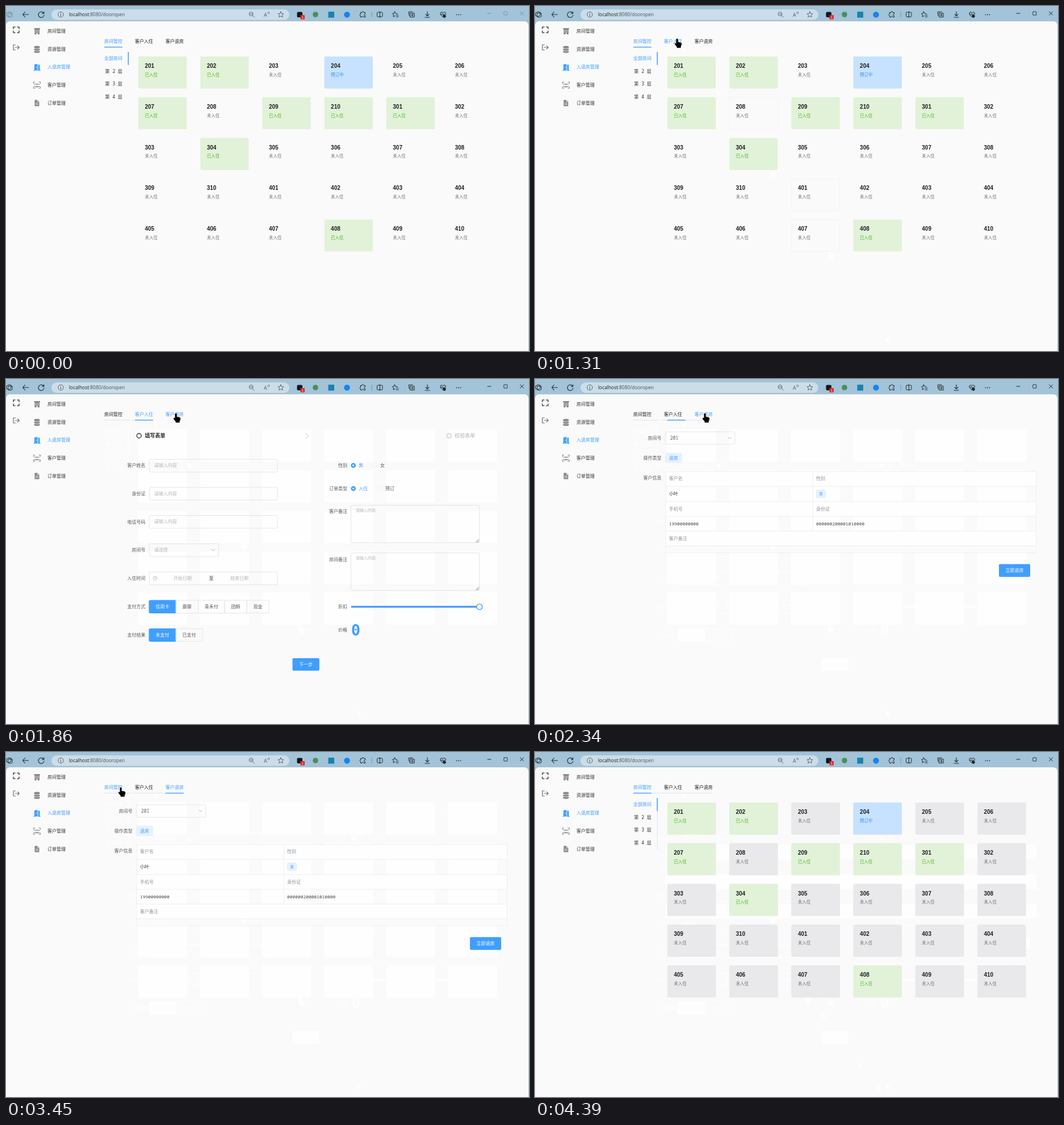
Write an HTML page with a canvas that moves like this. It is 921 px wide and 608 px high and loops after 4760 ms.

```html
<!DOCTYPE html>
<html lang="zh">
<head>
<meta charset="utf-8">
<title>房间管控</title>
<style>
html, body { margin: 0; width: 100%; height: 100%; overflow: hidden; background: #fafafa; }
canvas { display: block; width: 921px; height: 608px; }
</style>
</head>
<body>
<canvas id="stage" width="921" height="608"></canvas>
<script>
const ctx = document.getElementById('stage').getContext('2d');
const LOOP = 4760;
const ACTIVATE = 1310, TO_FORM = 1380, TO_CHECKOUT = 2340, TO_ROOMS = 3650;
const BLUE = '#409eff', INK = '#303133', GREY = '#909399', PALE = '#b3b6bc', LINE = '#e3e5ea';
const GREEN_BG = '#e1f2d8', BLUE_BG = '#c6e2ff', GREY_BG = '#e9e9eb', GHOST = '#fefefe';
const MONO = '"Noto Sans Mono", "Noto Sans CJK SC", "Noto Sans CJK", monospace';
const SANS = '"Liberation Sans", "Noto Sans CJK SC", sans-serif';

// The screen refreshes only at these moments.
const STEPS = [0, 360, 450, 550, 640, 740, 830, 940, 1030, 1310, 1380, 1470, 1570, 1670, 1770, 1860,
  2340, 2430, 2510, 2600, 2940, 3030, 3110, 3200, 3280, 3370, 3450,
  3650, 3740, 3800, 3870, 3950, 4030, 4110, 4200, 4290, 4390];

// Pointer tip: time, x, y
const PATH = [[360, 618, 582], [450, 518, 432], [550, 416, 286], [640, 320, 146], [740, 260, 71],
  [940, 254, 62], [1030, 250, 58], [1470, 250, 58], [1570, 262, 60], [1770, 297, 61], [1860, 299, 61],
  [2600, 299, 61], [2940, 290, 62], [3110, 258, 64], [3280, 220, 62], [3450, 202, 63], [3740, 202, 63],
  [3800, 290, 180], [3870, 400, 325], [3950, 478, 427], [4030, 505, 458], [4110, 533, 493],
  [4200, 570, 546], [4290, 603, 586], [4390, 621, 610]];

const TABS = ['房间管控', '客户入住', '客户退房'];
const tabX = i => 173 + 54 * i;

const ROOMS = Array.from({ length: 30 }, (_, i) => 201 + i % 10 + 100 * Math.floor(i / 10));
const TAKEN = [201, 202, 207, 209, 210, 301, 304, 408], BOOKED = 204;
const HOVERS = [[407, 450], [401, 550], [304, 550], [208, 640], [201, 740]];

let tint = null;
const paint = c => tint || c;

function box(x, y, w, h, r, fill, stroke, lw = 1) {
  ctx.beginPath();
  ctx.roundRect(x, y, w, h, r);
  if (fill) { ctx.fillStyle = paint(fill); ctx.fill(); }
  if (stroke) { ctx.strokeStyle = paint(stroke); ctx.lineWidth = lw; ctx.stroke(); }
}

function disc(x, y, r, fill, stroke, lw = 1) {
  box(x - r, y - r, 2 * r, 2 * r, r, fill, stroke, lw);
}

// y is the optical middle of the line
function text(s, x, y, color = INK, size = 8, align = 'left', weight = 400, family = MONO) {
  ctx.font = `${weight} ${size}px ${family}`;
  ctx.textAlign = align;
  ctx.fillStyle = paint(color);
  ctx.fillText(s, x, y + size * 0.37);
}

function icon(x, y, d, color, lw = 1, fill = false) {
  const p = new Path2D(d);
  ctx.save();
  ctx.translate(x, y);
  ctx.lineWidth = lw;
  ctx.lineJoin = ctx.lineCap = 'round';
  ctx.strokeStyle = ctx.fillStyle = paint(color);
  if (fill) ctx.fill(p); else ctx.stroke(p);
  ctx.restore();
}

const STAR = 'M0-5 1.5-1.7 5-1.4 2.4 1 3.2 4.6 0 2.7-3.2 4.6-2.4 1-5-1.4-1.5-1.7Z';
const CHEVRON = 'M-3-1.5 0 1.5 3-1.5';

function drawBrowser(t) {
  const ink = '#20262b', soft = '#4c5a64';
  const chrome = t < ACTIVATE ? '#7791a0' : ink;
  box(0, 0, 921, 608, 0, '#a2c3d8');
  box(0, 27, 920, 590, 7, '#fafafa');
  icon(6, 15, 'M-5-2.5-1-5 3-4V1L-1 4-5 2ZM-2-2.5H5V3.5L2 5-2 4Z', chrome);
  icon(34.5, 15, 'M5 0H-5M-1-4.5-5 0-1 4.5', ink, 1.1);
  icon(62, 15, 'M4.5-2A5 5 0 1 0 5 1M4.8-5V-1.8H1.6', ink, 1.1);
  box(80, 6, 419, 18.5, 9.2, '#cbdde8');
  disc(96.5, 15, 4.7, null, soft, 0.9);
  icon(96.5, 15, 'M0-.5V2.5M0-2.4V-2.2', soft);
  const url = '"Open Sans", sans-serif';
  text('localhost', 111, 15, '#1b1f22', 8.4, 'left', 400, url);
  const w = ctx.measureText('localhost').width;
  text(':8080/dooropen', 111 + w, 15, '#48545c', 8.4, 'left', 400, url);
  icon(433, 15, 'M2-1A3.4 3.4 0 1 1-4.8-1 3.4 3.4 0 1 1 2-1M1 1.6 4.5 5M-3-1H.3', soft, 0.9);
  text('A', 454, 15.5, soft, 9, 'left', 400, url);
  icon(461, 12, 'M0-1Q1 0 0 1M2-2Q3.5 0 2 2', soft, 0.8);
  icon(484, 15, STAR, soft, 0.9);

  box(512.5, 10.5, 9.5, 9.5, 2, '#161616');
  box(518.5, 16, 7.5, 7.5, 1, '#e0262c');
  text('1', 522.2, 19.8, '#fff', 6, 'center', 400, SANS);
  disc(545, 15, 4.8, '#4c8f54');
  box(567.5, 10, 10.5, 10.5, 0, '#1683b0');
  disc(600.5, 15.2, 5.2, '#1683f0');
  icon(628.5, 15, 'M-4-3.5H-1.5Q-1.5-5.5 0-5.5T1.5-3.5H4V-1Q2-1 2 .5T4 2V4.5H1.5Q1.5 3 0 3T-1.5 4.5H-4V2Q-5.5 2-5.5 .5T-4-1Z', ink);
  icon(644, 15, 'M0-4.5V4.5', '#7391a3', 0.9);
  box(653.5, 11, 9.5, 8, 1.5, null, ink);
  icon(658.3, 15, 'M0-5V5', ink);
  icon(686, 15, 'M-1.5-5-.2-2 3-1.6M-1.5-5-2.8-2-5.5-1.6-3.4.6-4 4-1.2 2.4M1 1H5M1 4H5', ink);
  icon(714, 15, 'M-2-2.5H5V4.5H-2ZM-4 2-5-4.5 2-5M1.5-1V3M-.5 1H3.5', ink);
  icon(742, 15, 'M0-5V2.5M-3-.4 0 2.6 3-.4M-4 5H4', ink, 1.1);
  icon(769.5, 15, 'M0 4.5-4.5 0Q-5.5-4-2.5-4.3-.8-4.3 0-2.7.8-4.3 2.5-4.3 5.5-4 4.8-.2M-4 0H-2L-1-1.5.5 1.5 1.5 0H3', ink);
  disc(772, 18, 2.7, ink);
  for (const dx of [-3.5, 0, 3.5]) disc(797 + dx, 15.3, 0.9, ink);
  icon(851, 13, 'M-3 0H3', chrome);
  box(876.8, 10, 6, 6, 0.5, null, chrome, 0.9);
  icon(908.5, 13, 'M-3-3 3 3M3-3-3 3', chrome);
}

function drawMenu() {
  const dark = '#4d4f53', mid = '#85888e';
  icon(18, 42, 'M-5-2V-5H-2M2-5H5V-2M5 2V5H2M-2 5H-5V2', dark, 1.6);
  icon(18, 73, 'M-1.5-4.5H-5V4.5H-1.5M-2 0H5M2.5-2.8 5.3 0 2.5 2.8', '#6b6e73', 1.2);

  box(49.5, 39, 10.5, 2, 0, mid);
  box(50.5, 41, 8.5, 9, 0, mid);
  for (const x of [52, 54.2, 56.4]) for (const y of [42.5, 45]) box(x, y, 1.1, 1.3, 0, '#fafafa');
  box(53.7, 47.5, 2, 2.5, 0, '#fafafa');

  for (const y of [72, 76, 80]) icon(54.5, y, 'M-5 0Q-5-1.7 0-1.7T5 0V1Q5 2.7 0 2.7T-5 1Z', mid, 1, true);
  icon(54.5, 74.6, 'M-5 0Q0 2 5 0M-5 4Q0 6 5 4', '#fafafa', 0.6);

  icon(54.5, 108, 'M-4.5-5 1-6V6L-4.5 5ZM2-4.5H5V5H6.5V6H2Z', BLUE, 1, true);
  box(48.5, 113, 3, 1, 0, BLUE);
  disc(53.8, 108, 0.8, '#fafafa');

  icon(54.5, 139.5, 'M-6-3V-5.5H-3.5M3.5-5.5H6V-3M6 3V5.5H3.5M-3.5 5.5H-6V3', mid, 1.1);
  for (const [dx, r] of [[-3.3, 1.1], [0, 1.4], [3.3, 1.1]]) disc(54.5 + dx, 137.8, r, mid);
  icon(54.5, 141.8, 'M-5 1Q-3.3-3-1.8 1ZM-2.2 1.5Q0-4 2.2 1.5ZM1.8 1Q3.3-3 5 1Z', mid, 1, true);

  icon(54.5, 171, 'M-4-5.5H1L4-2.5V5.5H-4Z', mid, 1, true);
  icon(54.5, 171, 'M-2 .2H2M-2 2.5H2M1-5V-2.5H3.5', '#fafafa', 0.8);

  ['房间管理', '资源管理', '入退房管理', '客户管理', '订单管理'].forEach((s, i) =>
    text(s, 73, 44 + 31.7 * i, i === 2 ? BLUE : INK));
}

const clamp = v => Math.max(0, Math.min(1, v));
const ease = k => k < 0.5 ? 2 * k * k : 1 - 2 * (1 - k) * (1 - k);
const moved = (t, start) => ease(clamp((t - start) / 300));

function pointer(t) {
  if (t < PATH[0][0] || t >= 4390) return null;
  const i = PATH.findIndex(p => p[0] > t) - 1;
  const [t0, x0, y0] = PATH[i], [t1, x1, y1] = PATH[i + 1];
  const k = (t - t0) / (t1 - t0);
  return [x0 + (x1 - x0) * k, y0 + (y1 - y0) * k];
}

const tabAt = (x, y) => y < 70 ? TABS.findIndex((_, i) => x >= tabX(i) - 11 && x < tabX(i) + 43) : -1;
const viewAt = t => t < TO_FORM || t >= TO_ROOMS ? 0 : t < TO_CHECKOUT ? 1 : 2;

function drawTabs(t, tip) {
  const active = viewAt(t), hover = tip ? tabAt(...tip) : -1;
  TABS.forEach((s, i) => text(s, tabX(i), 62, i === active || i === hover ? BLUE : '#1d1e20'));
  if (t >= TO_FORM) {
    const end = t < TO_CHECKOUT ? 259 : 313;
    box(173, 72, 46, 1, 0, '#e1e4ea');
    box(222, 72, end - 222, 1, 0, '#e1e4ea');
  }
  const x = 173 + 54 * (moved(t, 1340) + moved(t, 2270)) - 108 * moved(t, 3620);
  box(x, 71.8, 32, 1.4, 0, BLUE);
}

function drawFloors(rail) {
  if (rail) box(214.8, 81, 1, 91, 0, '#e1e4ea');
  ['全部房间', '第 2 层', '第 3 层', '第 4 层'].forEach((s, i) =>
    text(s, 205, 92.3 + 22.6 * i, i ? INK : BLUE, 8, 'right'));
  box(214.6, 81, 1.6, 23, 0, BLUE);
}

const cardPos = i => [233 + 109.2 * (i % 6), 89 + 71.8 * Math.floor(i / 6)];

function card(i, fill, stroke) {
  const [x, y] = cardPos(i);
  box(x, y, 85.4, 56.4, 2, fill, stroke);
}

function drawRooms(t) {
  const late = t >= TO_ROOMS;
  drawFloors(late);
  if (!late) for (const [room, from] of HOVERS) {
    if (t < from) continue;
    ctx.save();
    if (t - from < 200) { ctx.shadowBlur = 8; ctx.shadowColor = 'rgba(0,0,0,.12)'; }
    card(ROOMS.indexOf(room), '#fafafa', TAKEN.includes(room) ? '#fff' : '#f3f3f4');
    ctx.restore();
  }
  ROOMS.forEach((room, i) => {
    const [x, y] = cardPos(i);
    const taken = TAKEN.includes(room), booked = room === BOOKED;
    if (late) {
      card(i, room === 202 ? BLUE_BG : room === 408 ? GREEN_BG : GREY_BG);
      ctx.globalAlpha = clamp((t - TO_ROOMS) / 250);
    }
    const fill = taken ? GREEN_BG : booked ? BLUE_BG : late && GREY_BG;
    if (fill) card(i, fill);
    ctx.globalAlpha = 1;
    text(room, x + 11.5, y + 16.2, '#1f2023', 10, 'left', 700, SANS);
    text(taken ? '已入住' : booked ? '预订中' : '未入住', x + 11.5, y + 32,
      taken ? '#4db51f' : booked ? '#2f8ff5' : '#6d7075', 7.5, 'left', 500);
  });
}

function label(s, x, y) { text(s, x, y, '#55585d', 8, 'right'); }

function buttons(y, x, items) {
  items.forEach(([s, w], i) => {
    box(x, y, w, 22.5, i ? 0 : [2, 0, 0, 2], i ? null : BLUE, i ? LINE : BLUE);
    text(s, x + w / 2, y + 11.3, i ? '#55585d' : '#fff', 8, 'center');
    x += w;
  });
}

function radios(y, on, off, x) {
  disc(611.7, y, 4.3, BLUE);
  disc(611.7, y, 1.6, '#fff');
  text(on, 621, y, BLUE);
  disc(x, y, 4, null, '#f0f1f3');
  text(off, x + 10, y, '#55585d');
}

function drawForm() {
  disc(234.3, 100, 4, null, '#303133', 1.3);
  text('填写表单', 244.5, 100, '#1f2023', 9, 'left', 700);
  icon(530, 100, 'M-2.5-5 2.5 0-2.5 5', '#c5c8ce');
  disc(780, 100, 4, null, '#b5b8be');
  text('校验表单', 790, 100, '#b0b3b9', 9);

  ['客户姓名', '身份证', '电话号码', '房间号', '入住时间', '支付方式', '支付结果'].forEach((s, i) =>
    label(s, 245.5, 152.2 + 49.75 * i));
  for (const y of [141.5, 191, 240.5]) {
    box(252.5, y, 225.5, 22.5, 2, null, LINE);
    text('请输入内容', 261, y + 11, PALE);
  }
  box(252.5, 290.5, 122, 22.5, 2, null, LINE);
  text('请选择', 261, 301.3, PALE);
  icon(365, 301.5, CHEVRON, PALE);
  box(252.5, 340, 225.5, 22.5, 2, null, LINE);
  disc(262.5, 351, 3.4, null, PALE, 0.8);
  icon(262.5, 351, 'M0-1.8V.3H1.5', PALE, 0.8);
  text('开始日期', 295, 351, PALE);
  text('至', 361.5, 351, INK, 8, 'center');
  text('结束日期', 395, 351, PALE);
  buttons(390, 252, [['信用卡', 47], ['鹿聊', 39.5], ['青禾付', 46.5], ['团鹤', 39], ['现金', 39]]);
  buttons(440, 252, [['未支付', 47], ['已支付', 47]]);

  [['性别', 152.2], ['订单类型', 193], ['客户备注', 233.5], ['房间备注', 318], ['折扣', 401.5], ['价格', 442]]
    .forEach(([s, y]) => label(s, 601, y));
  radios(152.2, '男', '女', 649);
  radios(193, '入住', '预订', 658);
  for (const y of [222.5, 306.5]) {
    box(607.5, y, 226, 66, 2, null, LINE);
    text('请输入内容', 616, y + 9, PALE, 7);
    icon(830, y + 63, 'M-2.5 2.5 2.5-2.5M.5 2.5 2.5 .5', '#55585d', 0.8);
  }
  box(607.5, 399.8, 226, 3.2, 1.6, BLUE);
  disc(833.7, 401.4, 5, '#fff', BLUE, 1.4);
  text('0', 616, 442, BLUE, 27, 'center', 700, '"DejaVu Sans Mono", monospace');
  box(504.5, 492, 47.3, 22, 2, BLUE);
  text('下一步', 528, 503, '#fff', 8, 'center');
}

const ROWS = [163, 189, 216, 242, 268, 294, 306];

function drawBands() {
  for (const i of [0, 2, 4]) box(230, ROWS[i], 653, ROWS[i + 1] - ROWS[i], 0, GHOST);
}

function drawCheckout() {
  label('房间号', 222.7, 104);
  label('操作类型', 222.7, 139);
  label('客户信息', 222.7, 173.7);
  box(229.5, 93, 122.5, 22, 2, null, LINE);
  text('201', 238, 104, '#5d6066');
  icon(342.5, 104, CHEVRON, PALE);
  box(229, 130, 30, 18, 2, '#e6f2fe');
  text('退房', 244, 139, BLUE, 8, 'center');

  drawBands();
  for (const y of ROWS) box(230, y - 0.5, 653, 1, 0, '#eff0f3');
  for (const x of [229.5, 882]) box(x, 163, 1, 143, 0, '#eff0f3');
  box(488.7, 163, 1, 105, 0, '#eff0f3');
  text('客户名', 236, 175.3, GREY);
  text('性别', 495, 175.3, GREY);
  text('小叶', 236, 202.3);
  box(495.5, 195.5, 16, 13.5, 2, '#e6f2fe', '#d6eafe', 0.8);
  text('男', 503.5, 202.3, BLUE, 7, 'center');
  text('手机号', 236, 229, GREY);
  text('身份证', 495, 229, GREY);
  text('19900000000', 236, 255, '#44474c', 7.9);
  text('000000200001010000', 495, 255, '#44474c', 7.9);
  text('客户备注', 236, 280.7, GREY);
  box(817, 326.3, 55, 22.4, 2, BLUE);
  text('立即退房', 844.5, 337.5, '#fff', 8, 'center');
}

const HAND = 'M-1.4 1Q-1.4-.4 .2-.4T1.7 1V5.5L6 6.3Q8.7 7 8.4 9 8 12 6.8 13V15.8H-.2V14Q-2 12-4 9-4.3 6.8-2.6 7.2L-1.4 8.3Z';
const ARROW = 'M0 0V12L2.8 9.5 4.8 13.4 6.5 12.6 4.6 8.8H8.5Z';

function drawPointer([x, y], rooms, color) {
  const onCard = rooms && ROOMS.some((_, i) => {
    const [cx, cy] = cardPos(i);
    return x > cx && x < cx + 85.4 && y > cy && y < cy + 56.4;
  });
  icon(x, y, onCard || tabAt(x, y) >= 0 ? HAND : ARROW, color, 1, true);
}

// Faint marks left behind by earlier views and pointer positions
function drawResidue(t) {
  const view = viewAt(t);
  tint = GHOST;
  if (t >= TO_CHECKOUT) drawForm();
  if (t >= TO_ROOMS) { drawBands(); box(817, 326.3, 55, 22.4, 2, GHOST); }
  if (view) {
    drawFloors(true);
    ROOMS.forEach((_, i) => card(i, GHOST, GHOST));
  }
  PATH.forEach(([, x, y], i) => {
    if (y > 70 && PATH[i + 1] && t >= PATH[i + 1][0]) drawPointer([x, y], true, '#fff');
  });
  tint = null;
}

const VIEWS = [drawRooms, drawForm, drawCheckout];

function draw(now) {
  const raw = now % LOOP;
  const t = STEPS.filter(s => s <= raw).pop();
  const tip = pointer(t), view = viewAt(t);
  drawBrowser(t);
  drawMenu();
  drawResidue(t);
  drawTabs(t, tip);
  VIEWS[view](t);
  if (tip) drawPointer(tip, view === 0, '#000');
}

const start = performance.now();
function frame() {
  draw(performance.now() - start);
  requestAnimationFrame(frame);
}
frame();
</script>
</body>
</html>
```
